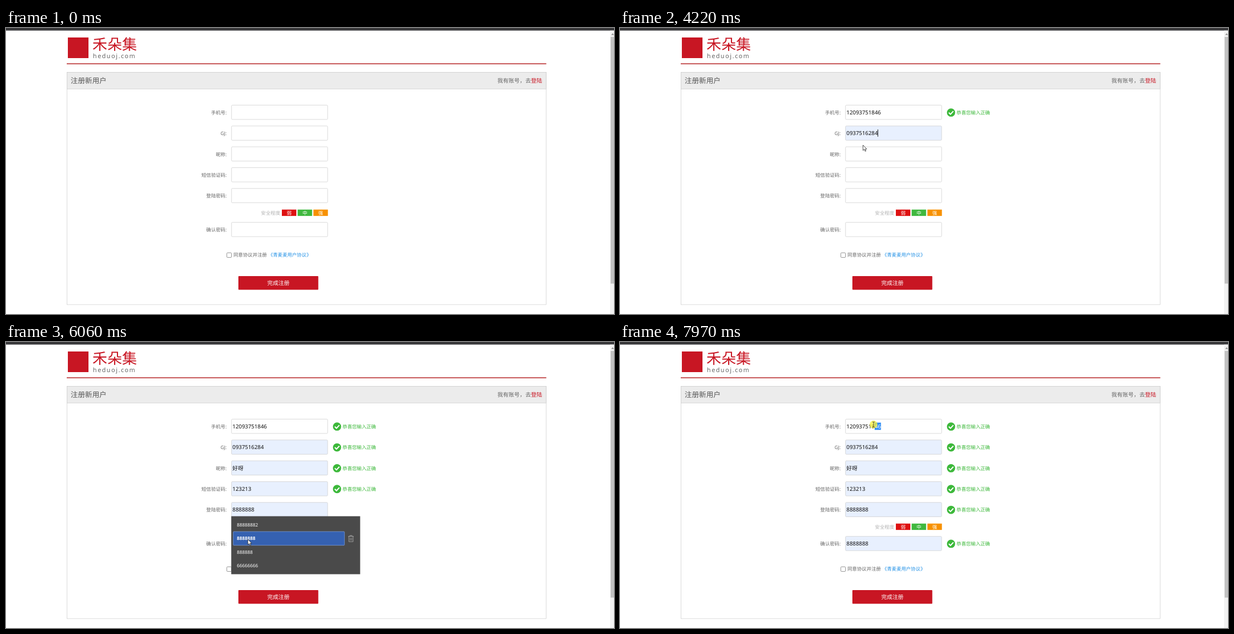
These frames come from a looping animation (1091x513 px, 8 s). An HTML page:

```html
<!DOCTYPE html>
<html lang="zh-CN">
<head>
<meta charset="utf-8">
<title>注册新用户</title>
<style>
  html, body { margin: 0; width: 100%; height: 100%; overflow: hidden; background: #fff; }
  svg { display: block; width: 100%; height: 100%; }
  text {
    font: 8.6px "Noto Sans", "Noto Sans CJK SC", "Noto Sans CJK", sans-serif;
    fill: #666; text-rendering: geometricPrecision; white-space: pre;
  }
  .red { fill: #c81623; }
  .white, text .picked { fill: #fff; }
  .mid { text-anchor: middle; }
  .end { text-anchor: end; }
  .size10 { font-size: 10.04px; }
  .title { font-size: 12.9px; fill: #555; }
  .brand { font-size: 26.7px; font-weight: 500; }
  .site { font-size: 11px; letter-spacing: 1.6px; }
  .faint { fill: #b3b3b3; }
  .link { fill: #2492e6; }
  .box { fill: #fff; stroke: #ccc; stroke-width: .72; }
  .box.filled { fill: #e8f0fe; }
  .head { fill: #ececec; }
  .value { font-size: 9.85px; fill: #111; }
  .ok { fill: #3cb83a; }
  .check { fill: none; stroke: #fff; stroke-width: 2; }
  .item { fill: #fff; font-size: 8.3px; }
  .item.on { font-weight: 700; }
  .bar { fill: #3561b1; stroke: #7c9cd6; stroke-width: .8; }
  .bin { fill: none; stroke: #b4b4b4; stroke-width: .8; }
</style>
</head>
<body>
<svg viewBox="0 0 1091 513">
  <rect width="1091" height="4.6" fill="#38383a"/>
  <rect x="1084" y="4.6" width="7" height="509" fill="#f1f1f1"/>
  <rect x="1085" y="16" width="6" height="442.5" fill="#c1c1c1"/>
  <path d="M1086 12.5l2.5-3 2.5 3z" fill="#8a8a8a"/>

  <rect class="red" x="111" y="17" width="37" height="37"/>
  <text class="brand red" x="155" y="39">禾朵集</text>
  <text class="site" x="156" y="53.5">heduoj.com</text>
  <rect x="109" y="63.5" width="860.5" height="1.43" fill="#b1191a"/>

  <rect class="box" x="109.5" y="79.5" width="859.7" height="416.6"/>
  <rect class="box head" style="fill:#ececec" x="109.5" y="79.5" width="859.7" height="29.8"/>
  <text class="title" x="116" y="99.3">注册新用户</text>
  <text class="size10 end" x="962" y="98.2">我有账号，去<tspan class="red">登陆</tspan></text>

  <text class="faint" x="457.6" y="334.7">安全程度</text>
  <g id="levels"></g>

  <rect x="396.2" y="403.2" width="8.4" height="8.4" rx="1.5" fill="#fff" stroke="#767676" stroke-width=".8"/>
  <text x="408" y="410.1">同意协议并注册</text>
  <text class="link" x="470.4" y="410.1">《青麦麦用户协议》</text>

  <rect class="red" x="417" y="445" width="143.4" height="24.4" rx="1"/>
  <text class="white mid size10" x="488.8" y="461">完成注册</text>

  <g id="rows"></g>
  <g id="popup"></g>
  <circle id="halo" r="7" fill="#f7f23a" fill-opacity=".75"/>
  <path id="arrow" d="M0 0V9.6L2.3 7.6 3.9 11.2 5.4 10.5 3.9 7.1H6.8Z" fill="#fff" stroke="#222" stroke-width=".8"/>
  <path id="beam" d="M-2-4.5H-.5L0-4 .5-4.5H2M0-4V4M-2 4.5H-.5L0 4 .5 4.5H2" fill="none" stroke="#333" stroke-width=".9"/>
</svg>
<script>
const LOOP = 8000, BLINK = 470, LEFT = 404.7, WIDTH = 172.4, HEIGHT = 25.6, TEXT_X = 406.3, ITEM = 24.15;
const ENTER = 30, LEAD = 60, CLICK = 110, OPEN_DELAY = 60, LEAVE = 7340, DRAG = 7830;
const $ = id => document.getElementById(id);

function add(parent, tag, attrs, text = '') {
  const el = document.createElementNS('http://www.w3.org/2000/svg', tag);
  for (const k in attrs) el.setAttribute(k, attrs[k]);
  el.textContent = text;
  return parent.appendChild(el);
}
const show = (el, on) => el.setAttribute('visibility', on ? 'visible' : 'hidden');

[['弱', '#de1111'], ['中', '#40b83f'], ['强', '#f79100']].forEach(([name, fill], i) => {
  const x = 495 + 28.3 * i;
  add($('levels'), 'rect', { x, y: 325.7, width: 26, height: 11.4, fill });
  add($('levels'), 'text', { class: 'white mid', x: x + 13, y: 334.7 }, name);
});

// focus and pick: the time of a click and its spot
const rows = [
  { label: '手机号:', value: '12093751846', focus: [430, 424, 150], hold: 340, typed: true },
  { label: 'GJ:', value: '0937516284', focus: [3650, 430, 188], pick: [4050, 436, 210] },
  { label: '昵称:', value: '好呀', focus: [4460, 437, 226], pick: [4830, 436, 245] },
  { label: '短信验证码:', value: '123213', focus: [5030, 431, 263], pick: [5340, 429, 296] },
  { label: '登陆密码:', value: '8888888', focus: [5590, 429, 297], pick: [6070, 434, 354],
    items: ['88888882', '8888888', '888888', '66666666'] },
  { label: '确认密码:', value: '8888888', focus: [6620, 438, 356], pick: [7050, 440, 413],
    items: ['88888882', '8888888'] }
];

// typing starts slowly and gets quicker
const keyTime = i => 1240 + 180 * i + 130 * Math.sin(Math.PI * i / 10);

const stops = [[ENTER, 1024, 508]];
const presses = [[DRAG, LOOP], [LEAVE, LEAVE + CLICK]];
rows.forEach((r, i) => {
  r.y = 138.4 + 37.35 * i + (i === 5 ? 23.5 : 0);
  r.blur = rows[i + 1]?.focus[0] ?? LEAVE;
  for (const c of [r.focus, r.pick]) {
    if (!c) continue;
    stops.push([c[0] - LEAD, c[1], c[2]]);
    presses.push([c[0], c[0] + (r.hold ?? CLICK)]);
  }
  build(r);
});
stops.push([LEAVE - LEAD, 738, 300], [LOOP - 40, 455, 148]);

function build(r) {
  const g = $('rows'), mid = r.y + HEIGHT / 2;
  r.items ??= [r.value];
  add(g, 'text', { class: 'end', x: 396, y: mid + 3.8 }, r.label);
  r.box = add(g, 'rect', { class: 'box', x: LEFT, y: r.y, width: WIDTH, height: HEIGHT, rx: 1.5 });
  r.mark = add(g, 'rect', { y: mid - 6.6, height: 13, fill: '#2d8cf5' });
  r.text = add(g, 'text', { class: 'value', x: TEXT_X, y: mid + 3.7 });
  r.plain = add(r.text, 'tspan', {});
  r.picked = add(r.text, 'tspan', { class: 'picked' });
  r.caret = add(g, 'rect', { y: mid - 6.6, width: .9, height: 13, fill: '#000' });
  r.tick = add(g, 'g', {});
  add(r.tick, 'circle', { class: 'ok', cx: 594, cy: mid + .5, r: 7.4 });
  add(r.tick, 'path', { class: 'check', d: `M590 ${mid + .5}l3 3 5.2-5.6` });
  add(r.tick, 'text', { class: 'ok', x: 603.8, y: mid + 3.8 }, '恭喜您输入正确');

  r.top = r.y + 24.7;
  r.list = add($('popup'), 'g', {});
  add(r.list, 'rect', { x: 404.2, y: r.top, width: 231.3, height: 7.4 + ITEM * r.items.length, fill: '#4a4a4a' });
  r.hover = add(r.list, 'g', {});
  add(r.hover, 'rect', { class: 'bar', x: 407.8, y: r.top + 3.4, width: 199.5, height: 24.6, rx: 1 });
  add(r.hover, 'path', { class: 'bin', transform: `translate(614 ${r.top + 10.5})`,
    d: 'M0 1.5h10M3 1.5v-1.5h4v1.5M1.2 1.5v9.5h7.6v-9.5M3.7 4v5M6.3 4v5' });
  r.options = r.items.map((s, i) =>
    add(r.list, 'text', { class: 'item', x: 414.3, y: r.top + 18.8 + ITEM * i }, s));
}

// the pointer waits, then moves to the next stop; longer ways take longer
function pointerAt(t) {
  const i = stops.findIndex(s => s[0] > t);
  if (i < 0) return stops.at(-1).slice(1);
  const [t1, x1, y1] = stops[i], [t0, x0, y0] = stops[Math.max(i - 1, 0)];
  const time = Math.min(t1 - t0, 150 + 1.2 * Math.hypot(x1 - x0, y1 - y0));
  const k = Math.max(0, 1 - (t1 - t) / (time || 1)), e = 1 - (1 - k) ** 2;
  return [x0 + (x1 - x0) * e, y0 + (y1 - y0) * e];
}

function drawRow(r, t, x, y) {
  const focusAt = r.focus[0], pickAt = r.pick?.[0];
  const open = t >= focusAt + OPEN_DELAY && t < pickAt, done = t >= pickAt;
  const slot = Math.floor((y - r.top - 3.4) / ITEM);
  const over = open && r.items[slot] ? slot : -1;

  let text = done ? r.value : '', edited = done ? pickAt : focusAt;
  if (over >= 0) text = r.items[over];
  if (r.typed) {
    const n = [...r.value].filter((_, i) => keyTime(i) <= t).length;
    text = r.value.slice(0, n);
    edited = n ? keyTime(n - 1) : focusAt - 200;
  }
  r.plain.textContent = text;
  r.picked.textContent = '';
  const full = text ? r.text.getComputedTextLength() : 0;

  const dragging = r.typed && t >= DRAG;
  if (dragging) {
    const unit = full / text.length;
    const n = Math.min(text.length, Math.round((x - TEXT_X) / unit));
    r.plain.textContent = text.slice(0, n);
    r.picked.textContent = text.slice(n);
    r.mark.setAttribute('x', TEXT_X + n * unit);
    r.mark.setAttribute('width', full - n * unit);
  }
  show(r.mark, dragging);

  const focused = t >= focusAt && t < r.blur;
  show(r.caret, focused && (t - edited) % (2 * BLINK) < BLINK);
  r.caret.setAttribute('x', TEXT_X - .3 + (over >= 0 ? 0 : full));

  r.box.classList.toggle('filled', done || over >= 0);
  show(r.tick, t >= r.blur);
  show(r.list, open);
  show(r.hover, over >= 0);
  r.hover.setAttribute('transform', `translate(0 ${ITEM * Math.max(over, 0)})`);
  r.options.forEach((o, i) => o.classList.toggle('on', i === over));
  return open && y > r.top;
}

function draw(t) {
  const [x, y] = pointerAt(t);
  const onList = rows.map(r => drawRow(r, t, x, y)).some(Boolean);
  const onField = !onList && x > LEFT && x < LEFT + WIDTH && rows.some(r => y > r.y && y < r.y + HEIGHT);
  show($('beam'), t >= ENTER && onField);
  show($('arrow'), t >= ENTER && !onField);
  show($('halo'), presses.some(([a, b]) => t >= a && t < b));
  for (const id of ['beam', 'arrow', 'halo']) $(id).setAttribute('transform', `translate(${x} ${y})`);
}

let start;
function frame(now) {
  start ??= now;
  draw((now - start) % LOOP);
  requestAnimationFrame(frame);
}
draw(0);
requestAnimationFrame(frame);
</script>
</body>
</html>
```
